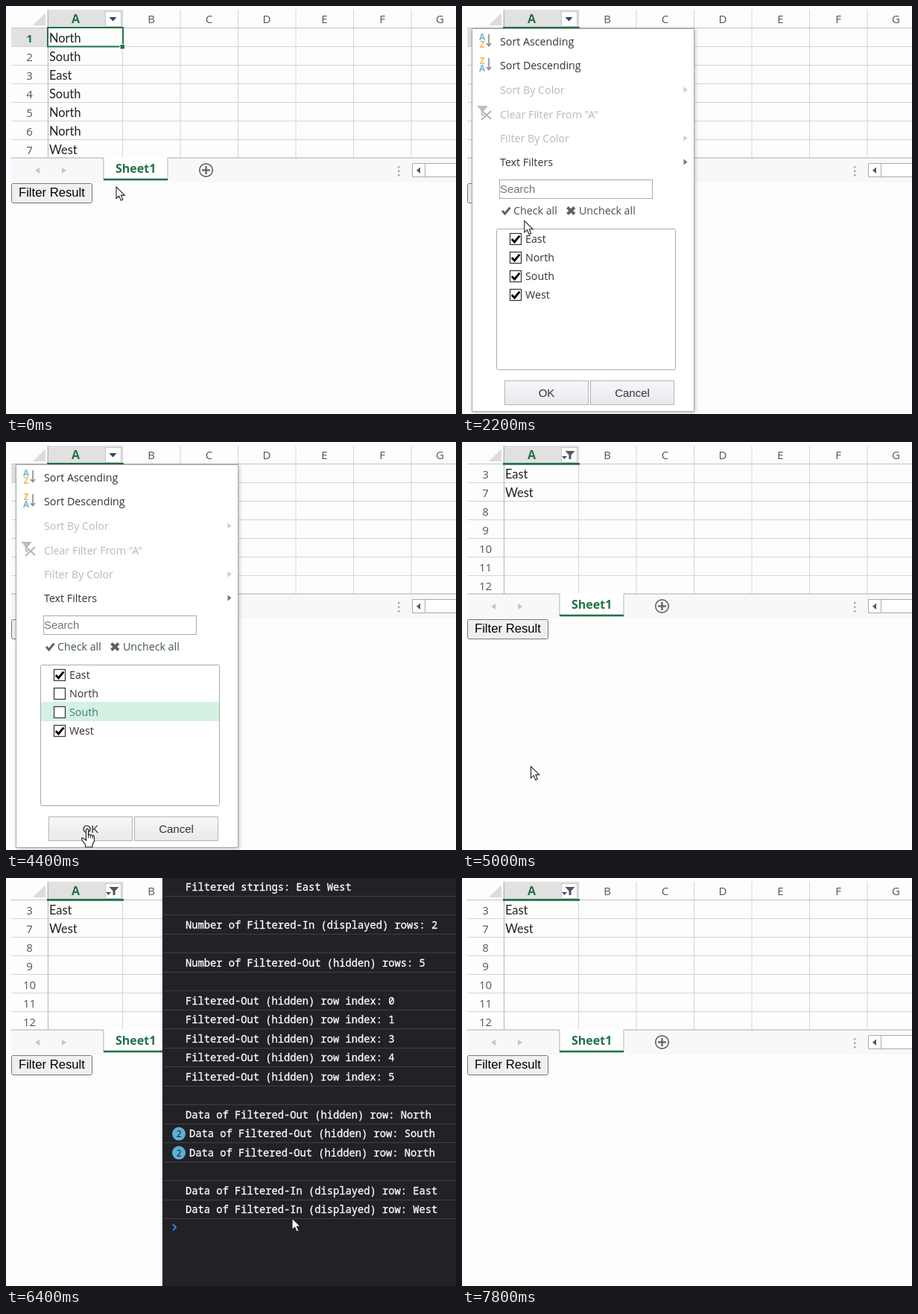
An HTML page that plays this animation: 604 by 548 pixels, repeating every 8000 ms.

```html
<!DOCTYPE html>
<html lang="en">
<head>
<meta charset="utf-8">
<title>Column filter demo</title>
<style>
  html, body { margin: 0; width: 100%; height: 100%; overflow: hidden; background: #fdfdfd; }
  svg { display: block; width: 604px; height: 548px; }
  text { white-space: pre; }
  .ui { font-family: "Open Sans", "Noto Sans", sans-serif; }
  .cell { font-family: Lato, "Open Sans", sans-serif; }
  .arial { font-family: "Liberation Sans", Arial, sans-serif; }
  .mono { font-family: "Noto Sans Mono", "DejaVu Sans Mono", monospace; }
</style>
</head>
<body>
<svg id="stage" viewBox="0 0 604 548" xmlns="http://www.w3.org/2000/svg"></svg>
<script>
const LOOP = 8000, STEP = 200;
const GREEN = '#217346';
const MENU_OPEN = 1600, NORTH_OFF = 2800, SOUTH_OFF = 3600, MENU_CLOSE = 4600;
const CONSOLE_OPEN = 6400, CURSOR_GONE = 7600, CONSOLE_CLOSE = 7800;

const range = n => [...Array(n).keys()];
const each = (list, fn) => list.map(fn).join('');
const rect = (x, y, w, h, fill, more = '') =>
  `<rect x="${x}" y="${y}" width="${w}" height="${h}" fill="${fill}" ${more}/>`;
const line = (x1, y1, x2, y2, color, width = 1) =>
  `<path d="M${x1} ${y1}L${x2} ${y2}" stroke="${color}" stroke-width="${width}"/>`;
const shape = (d, fill, more = '') => `<path d="${d}" fill="${fill}" ${more}/>`;
const label = (x, y, str, size, fill, more = '', font = 'ui') =>
  `<text class="${font}" x="${x}" y="${y}" font-size="${size}" fill="${fill}" ${more}>${str}</text>`;
const MID = 'text-anchor="middle" ';
const BOLD = 'font-weight="700" ';

function grid() {
  const columnX = i => 156.5 + 77.5 * i;
  return rect(55, 5, 102, 24, '#e1e1e1')
    + shape('M36 26L53 9V26Z', '#dcdcdc')
    + each(range(6), i => line(columnX(i), 5, columnX(i), 204, '#d4d4d4'))
    + each(range(6), i => line(7, 54.5 + 25 * i, 604, 54.5 + 25 * i, '#d4d4d4'))
    + line(7, 29.5, 604, 29.5, '#c3c3c3')
    + line(56.5, 5, 56.5, 204, '#b5b5b5')
    + label(93.5, 23, 'A', 16, GREEN, MID + BOLD)
    + each([...'BCDEFG'], (c, i) => label(195 + 77.5 * i, 23, c, 15, '#555', MID))
    + rect(133.5, 7.5, 21, 20, '#fff', 'stroke="#c9c9c9"');
}

function rows(numbers, values, active) {
  return each(numbers, (n, i) =>
      label(31.5, 48.5 + 25 * i, n, 15, n === active ? GREEN : '#555', MID + (n === active ? BOLD : '')))
    + each(values, (v, i) => label(58, 49 + 25 * i, v, 16.4, '#222', '', 'cell'));
}

function fullSheet() {
  return rect(7, 30, 49, 24, '#e1e1e1')
    + rows([1, 2, 3, 4, 5, 6, 7], ['North', 'South', 'East', 'South', 'North', 'North', 'West'], 1)
    + shape('M138.5 15H148.5L143.5 20.5Z', '#3b3c68')
    + rect(56, 29, 101, 25.5, 'none', `stroke="${GREEN}" stroke-width="2"`)
    + rect(153, 51.5, 6.5, 6.5, GREEN, 'stroke="#fff"');
}

function filteredSheet() {
  return rows([3, 7, 8, 9, 10, 11, 12], ['East', 'West'])
    + shape('M138.5 12H151.5L146.5 17.5V23H143.5V17.5Z', '#55565c')
    + shape('M134 19H141L137.5 23Z', '#3b4f80');
}

function tabBar() {
  return rect(7, 204, 597, 33, '#f8f8fb')
    + line(7, 204, 604, 204, '#ababab')
    + shape('M45 217V225L39 221Z M75 217V225L81 221Z', '#c6c6c6')
    + rect(131, 203, 86, 30, '#fff')
    + line(131, 204, 131, 234, '#b5b5b5') + line(217, 204, 217, 234, '#b5b5b5')
    + rect(131, 231.7, 86, 2.6, GREEN)
    + label(147, 224, 'Sheet1', 16, GREEN, BOLD)
    + '<circle cx="268.5" cy="220.5" r="8.7" fill="none" stroke="#666" stroke-width="1.7"/>'
    + line(263, 220.5, 274, 220.5, '#666', 2.4) + line(268.5, 215, 268.5, 226, '#666', 2.4)
    + each([215, 220.5, 226], y => rect(526, y, 2.5, 2.5, '#aaa'))
    + rect(545.5, 211.5, 70, 18, '#fff', 'stroke="#ababab"')
    + line(562.5, 211, 562.5, 230, '#ababab')
    + shape('M556 216.5V225L551 220.7Z', '#555');
}

function sortIcon(y, top, bottom) {
  const color = { A: '#6cb8d8', Z: '#efb75f' };
  return label(27, y - 1, top, 11.5, color[top], MID + BOLD)
    + label(27, y + 8.5, bottom, 11.5, color[bottom], MID + BOLD)
    + `<path d="M36 ${y - 9}V${y + 6}M33 ${y + 3}L36 ${y + 6.5}L39 ${y + 3}" fill="none" stroke="#8a8a8a" stroke-width="1.6"/>`;
}

const tick = (x, y, color, w) =>
  `<path d="M${x} ${y}l3.7 4l6.8 -8.4" fill="none" stroke="${color}" stroke-width="${w}"/>`;

function checkItem(name, i) {
  const y = 305 + 25 * i;
  return rect(47, y - 6, 239, 26, '#d4f1e4', `id="hover${name}"`)
    + rect(64.5, y + .5, 15, 15, '#fff', 'stroke="#333" stroke-width="1.2"')
    + `<g id="tick${name}">${tick(66.8, y + 8, '#000', 2.8)}</g>`
    + label(85, y + 13, name, 14.25, '#333', `id="name${name}"`);
}

function button(x, w, str) {
  return rect(x + .5, 503.5, w, 32, 'url(#buttonFill)', 'stroke="#b4b4b4"')
    + label(x + w / 2 + .5, 525, str, 15, '#333', MID, 'arial');
}

function menu() {
  const items = [
    ['Sort Ascending', 53], ['Sort Descending', 85], ['Sort By Color', 118, true],
    ['Clear Filter From "A"', 151, true], ['Filter By Color', 183, true], ['Text Filters', 215]];
  const arrow = (y, color) => shape(`M297.5 ${y - 4}V${y + 4}L302.5 ${y}Z`, color);
  return rect(13.5, 30.5, 298, 514, '#fff', 'stroke="#ababab" filter="url(#shadow)"')
    + each(items, ([str, y, off]) => label(51, y, str, 14.25, off ? '#b9b9b9' : '#333'))
    + sortIcon(47, 'A', 'Z') + sortIcon(79, 'Z', 'A')
    + shape('M20 134H35L30 140V150L25.5 146V140Z', '#bdbdbd')
    + '<path d="M26 153L39 141M28 142L39 152" stroke="#fff" stroke-width="4"/>'
    + '<path d="M26 153L39 141M28 142L39 152" stroke="#b4b4b4" stroke-width="2"/>'
    + arrow(112.5, '#ccc') + arrow(177.5, '#ccc') + arrow(209.5, '#777')
    + rect(50.5, 233.5, 205, 25, '#fff', 'stroke="#aaa"')
    + label(51, 251, 'Search', 14.9, '#757575', '', 'arial')
    + tick(54, 275, '#5d6357', 3) + label(69, 280, 'Check all', 14.25, '#44525c')
    + '<path d="M141.5 270.5L151 279.5M151 270.5L141.5 279.5" stroke="#5d6357" stroke-width="3.8"/>'
    + label(157, 280, 'Uncheck all', 14.25, '#44525c')
    + rect(46.5, 299.5, 240, 189, '#fff', 'rx="2" stroke="#aaa"')
    + each(['East', 'North', 'South', 'West'], checkItem)
    + button(57, 112, 'OK') + button(172, 112, 'Cancel');
}

function devConsole() {
  const hidden = 'Filtered-Out (hidden) row', shown = 'Filtered-In (displayed) row';
  const log = [
    'Filtered strings: East West', '', `Number of ${shown}s: 2`, '', `Number of ${hidden}s: 5`, '',
    ...[0, 1, 3, 4, 5].map(n => `${hidden} index: ${n}`), '',
    `Data of ${hidden}: North`, `2|Data of ${hidden}: South`, `2|Data of ${hidden}: North`, '',
    `Data of ${shown}: East`, `Data of ${shown}: West`];
  const pitch = 25.47;
  return rect(210, -10, 420, 580, '#202326', 'filter="url(#shadow)"')
    + each(log, (entry, i) => {
      const [str, count] = entry.split('|').reverse();
      const y = 12.5 + pitch * i;
      const badge = count ? `<circle cx="232" cy="${y}" r="9" fill="#5db0d7"/>`
        + label(232, y + 4.5, count, 12, '#202124', MID, 'mono') : '';
      return line(211, Math.floor(y + 12) + .5, 604, Math.floor(y + 12) + .5, '#3d4043') + badge
        + label(count ? 246 : 241, y + 4.5, str, 13.75, '#fff', 'stroke="#fff" stroke-width=".3"', 'mono');
    })
    + '<path d="M224 465L228 469.2L224 473.4" fill="none" stroke="#3f7fe8" stroke-width="2"/>';
}

const arrowCursor = shape('M0 0V15.5L3.7 12.1L6.3 18.1L8.9 16.9L6.4 11.1H11.3Z', '#fff',
  'stroke="#222" stroke-width="1.1"');
const handCursor = shape(
  'M-1.5 1.5Q0 -.6 1.5 1.5V9Q3.5 7.2 4.5 9.3Q6.4 8 7.2 10Q9.2 9 9.5 11.5V17L7 21.5V25H-2.5V22'
  + 'L-7 15.5Q-8.5 12.5 -5.5 13L-1.5 16Z', '#fff', 'stroke="#222" stroke-width="1.2"')
  + '<path d="M1.5 9V13M4.5 9.5V13M7.2 10.5V13.5" stroke="#222"/>';

document.getElementById('stage').innerHTML = `
  <defs>
    <filter id="shadow" x="-10%" y="-10%" width="120%" height="120%">
      <feDropShadow dx="1" dy="1" stdDeviation="2.5" flood-color="#000" flood-opacity=".28"/>
    </filter>
    <linearGradient id="buttonFill" x2="0" y2="1">
      <stop stop-color="#f7f7f9"/><stop offset="1" stop-color="#e9e9ee"/>
    </linearGradient>
  </defs>
  ${rect(0, 0, 604, 548, '#fdfdfd')}
  ${grid()}
  <g id="full">${fullSheet()}</g>
  <g id="filtered">${filteredSheet()}</g>
  <g id="underline">${rect(55, 28, 103, 2.8, GREEN)}</g>
  ${tabBar()}
  ${rect(7.5, 238.5, 108, 26, '#efefef', 'id="resultButton" rx="2" stroke="#767676"')}
  ${label(17, 256, 'Filter Result', 16.67, '#000', '', 'arial')}
  <g id="menu">${menu()}</g>
  <g id="console">${devConsole()}</g>
  <g id="cursor"><g id="arrow">${arrowCursor}</g><g id="hand">${handCursor}</g></g>`;

const el = id => document.getElementById(id);
const show = (id, on) => el(id).setAttribute('display', on ? 'inline' : 'none');

// time, x, y
const path = [
  [0, 148, 243], [1200, 142, 22], [1600, 142, 22], [2400, 73, 338], [3000, 73, 338],
  [3400, 73, 364], [3600, 73, 364], [4000, 109, 519], [4400, 109, 519],
  [6000, 57, 256], [6399, 57, 256], [6400, 384, 457], [LOOP, 384, 457]];

function cursorAt(t) {
  const i = path.findIndex(key => key[0] > t);
  const [t0, x0, y0] = path[i - 1], [t1, x1, y1] = path[i];
  const k = (t - t0) / (t1 - t0), e = k * k * (3 - 2 * k);
  return [x0 + (x1 - x0) * e, y0 + (y1 - y0) * e];
}

function hoveredItem(t) {
  if (t >= 3400) return 'South';
  return t >= 2400 ? 'North' : '';
}

function draw(time) {
  const t = Math.floor((time % LOOP) / STEP) * STEP;
  const filtered = t >= MENU_CLOSE;
  const menuOpen = t >= MENU_OPEN && !filtered;
  const [x, y] = cursorAt(t);

  show('full', !filtered);
  show('filtered', filtered);
  show('underline', t >= MENU_OPEN);
  show('menu', menuOpen);
  show('console', t >= CONSOLE_OPEN && t < CONSOLE_CLOSE);

  for (const name of ['East', 'North', 'South', 'West']) {
    const hover = name === hoveredItem(t);
    show('hover' + name, hover);
    el('name' + name).setAttribute('fill', hover ? '#437c79' : '#333');
  }
  show('tickNorth', t < NORTH_OFF);
  show('tickSouth', t < SOUTH_OFF);

  const overResult = !menuOpen && x > 7 && x < 116 && y > 238 && y < 265;
  el('resultButton').setAttribute('fill', overResult ? '#e3e3e3' : '#efefef');

  const overOk = menuOpen && x > 57 && x < 169 && y > 503;
  show('hand', overOk);
  show('arrow', !overOk);
  show('cursor', t < CURSOR_GONE);
  el('cursor').setAttribute('transform', `translate(${x.toFixed(1)} ${y.toFixed(1)})`);
}

const start = performance.now();
function tickFrame() {
  draw(performance.now() - start);
  requestAnimationFrame(tickFrame);
}
tickFrame();
</script>
</body>
</html>
```
